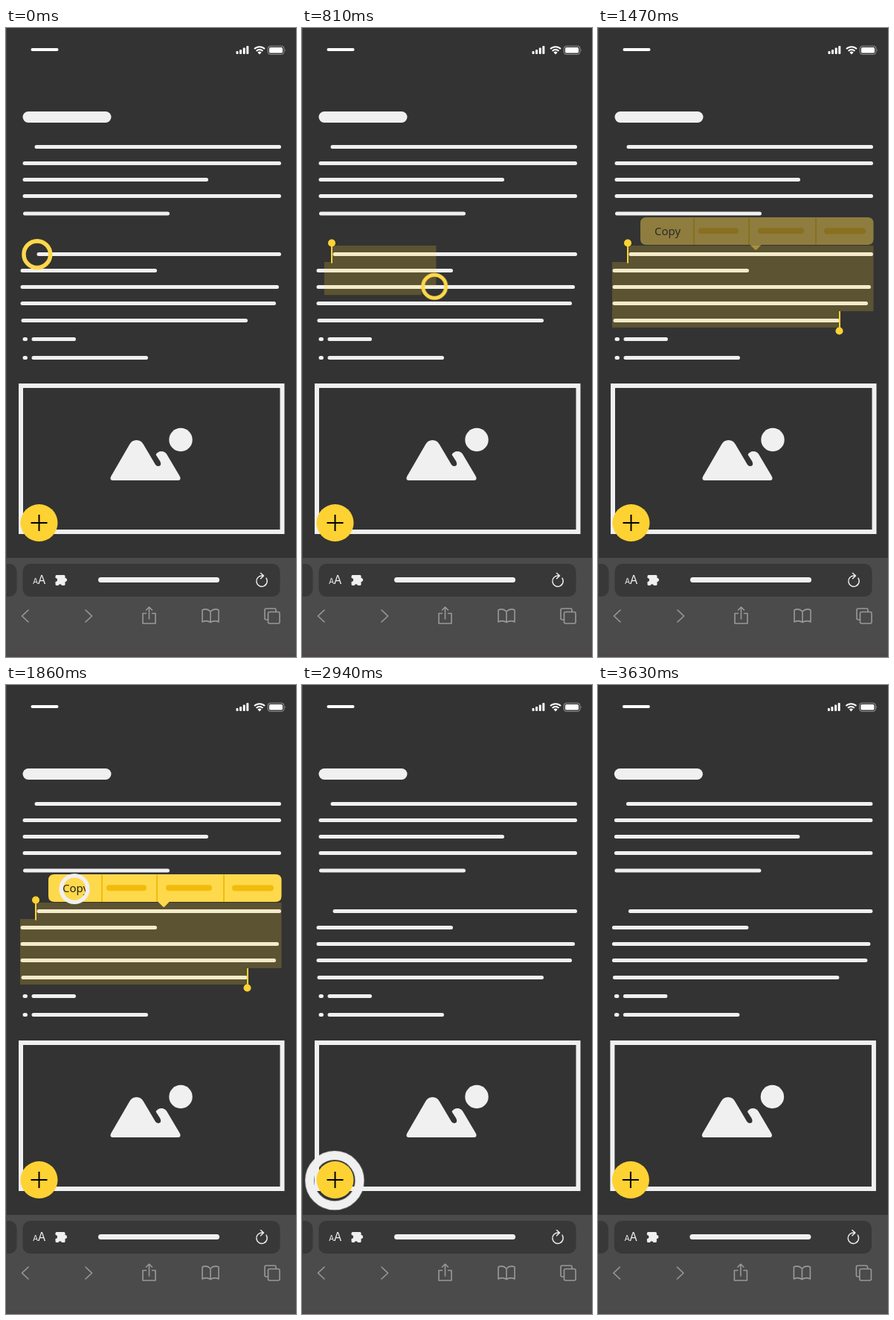
These frames come from a looping animation (390 by 844 pixels, 3840 ms). An HTML page without scripts:

```html
<!DOCTYPE html>
<html lang="en">
<head>
<meta charset="utf-8">
<title>Select and copy</title>
<style>
html, body { margin: 0; width: 100%; height: 100%; overflow: hidden; background: #333; }
svg { display: block; width: 390px; height: 844px; }
.screen, .edge, .ring, .cursor, .dot, .end, .selection, .menu { animation: 3840ms linear infinite; }
.line { fill: none; stroke: #f0f0f0; stroke-width: 5; stroke-linecap: round; }
.icon { fill: none; stroke: #999; stroke-width: 1.6; stroke-linecap: round; stroke-linejoin: round; }
.accent { fill: #ffd233; }
.ring { fill: none; stroke: #f0f0f0; r: 15.5px; stroke-width: 5px; }

.screen { animation-name: nudge; }
.edge { animation-name: edge; }
.drag { stroke: #ffd84a; animation-name: drag, lift; }
.tap { animation-name: tap, fade; }
.copy { animation-delay: -1980ms; }
.add { animation-delay: -990ms; }
.selection { fill: #ffd433; fill-opacity: .2; animation-name: select; }
.cursor { animation-name: cursor; }
.dot { animation-name: dot; }
.end { animation-name: end; }
.menu { animation-name: menu; }

@keyframes nudge {
  0%, 87.49% { transform: none; }
  87.5%, 100% { transform: translateX(-.6px); }
}
@keyframes edge {
  0%, 87.49% { opacity: 1; }
  87.5%, 100% { opacity: 0; }
}
/* press, follow the finger, release */
@keyframes drag {
  0% { r: 17.75px; stroke-width: 5.5px; translate: 0 0; animation-timing-function: cubic-bezier(.33, .4, .67, 1); }
  4.6875% { r: 32px; stroke-width: 12px; translate: 0 1px; animation-timing-function: ease-in-out; }
  14.0625% { r: 15.5px; stroke-width: 5px; translate: 0 0; animation-timing-function: ease-in-out; }
  28.125% { r: 15.5px; stroke-width: 5px; translate: 271px 85.5px; animation-timing-function: ease-out; }
  35.156%, 100% { r: 30px; stroke-width: 5px; translate: 271px 85.5px; }
}
@keyframes lift {
  0% { opacity: 1; }
  28.125% { opacity: 1; animation-timing-function: ease-in; }
  35.156%, 100% { opacity: 0; }
}
@keyframes tap {
  0% { r: 17.75px; stroke-width: 5.5px; translate: -1px 0; animation-timing-function: cubic-bezier(.33, .4, .67, 1); }
  4.6875% { r: 32px; stroke-width: 12px; translate: 0 1px; animation-timing-function: ease-in-out; }
  13.28125% { r: 15.5px; stroke-width: 5px; translate: 0 0; animation-timing-function: ease-out; }
  20.3125%, 100% { r: 30px; stroke-width: 5px; translate: 0 0; }
}
@keyframes fade {
  0% { opacity: 1; }
  13.28125% { opacity: 1; animation-timing-function: ease-in; }
  20.3125%, 100% { opacity: 0; }
}
@keyframes select {
  0% { d: path("M41 292H41V314H41V314H41V314H41Z"); }
  14.0625% { d: path("M41 292H41V314H41V314H41V314H41Z"); animation-timing-function: ease-in-out; }
  28.125% { d: path("M41 292H318V380H279V402H19V314H41Z"); animation-timing-function: ease-out; }
  35.156%, 68.74% { d: path("M41 292H370.500V380H326V402H19V314H41Z"); }
  68.75%, 100% { d: path("M41 292H41V314H41V314H41V314H41Z"); }
}
@keyframes cursor {
  0%, 7.8% { opacity: 0; }
  14.0625%, 68.74% { opacity: 1; }
  68.75%, 100% { opacity: 0; }
}
@keyframes dot {
  0%, 14.0625% { r: 0; }
  21%, 68.74% { r: 5px; }
  68.75%, 100% { r: 0; }
}
@keyframes end {
  0%, 28.125% { opacity: 0; }
  35.156%, 68.74% { opacity: 1; }
  68.75%, 100% { opacity: 0; }
}
@keyframes menu {
  0%, 35.156% { opacity: 0; }
  42.1875%, 62.49% { opacity: 1; }
  62.5%, 100% { opacity: 0; }
}
</style>
</head>
<body>
<svg viewBox="0 0 390 844">
  <rect width="390" height="844" fill="#333"/>
  <rect y="711" width="391" height="133" fill="#4b4b4b"/>
  <rect y="840" width="391" height="4" fill="#4d474a"/>

  <g class="screen">
    <!-- status bar -->
    <path class="line" style="stroke:#fff;stroke-width:4" d="M35.500 29H68.500"/>
    <g fill="#fff">
      <rect x="309.500" y="31" width="3" height="4" rx="1"/>
      <rect x="314" y="29" width="3" height="6" rx="1"/>
      <rect x="318.700" y="26.500" width="3" height="8.500" rx="1"/>
      <rect x="323.300" y="24" width="3" height="11" rx="1"/>
      <path d="M341 35.500l-2.600-2.700a3.800 3.800 0 0 1 5.200 0z"/>
      <rect x="354" y="26" width="18" height="7.500" rx="1.500"/>
      <path d="M375 28.200q1.500 1.500 0 3.400z" opacity=".5"/>
    </g>
    <path d="M334 28a10 10 0 0 1 14 0M336.600 30.900a6.300 6.300 0 0 1 8.800 0" fill="none" stroke="#fff" stroke-width="2"/>
    <rect x="352.300" y="24.300" width="21.500" height="11" rx="3" fill="none" stroke="#fff" stroke-opacity=".5"/>

    <!-- article -->
    <rect x="22.500" y="112" width="119" height="15" rx="7.500" fill="#f0f0f0"/>
    <path class="line" d="M41 159.500H367.500M25 181.500H367.500M25 203.500H269.500M25 225.500H367.500M25.500 249H217.500
      M44 303.500H367.500M22 325.500H200.500M22 347.500H364.500M22 369.500H360.500M23 392.500H322.500
      M25 417.500H26.500M37 417.500H91.500M25 442.500H26.500M37 442.500H188.500"/>
    <rect x="20" y="480" width="351.500" height="196" fill="none" stroke="#f0f0f0" stroke-width="6"/>
    <g fill="#f0f0f0">
      <circle cx="235" cy="552.500" r="15.700"/>
      <path d="M141 602L166 559Q169 553 175.500 553T185 559L201 586Q204 589.500 207.500 587Q209 584.500 207 581L201.500 572.500Q204 568 209 568Q214 568 216.500 572.500L234 602Q236 607 231 607H144Q139 607 141 602Z"/>
    </g>
    <circle class="accent" cx="44.500" cy="664" r="25"/>
    <path d="M33.500 664h22M44.500 653v22" stroke="#000" stroke-width="2"/>

    <!-- browser bar -->
    <rect x="-20" y="719" width="34.500" height="44" rx="10" fill="#383838"/>
    <rect x="22.500" y="719" width="346" height="44" rx="10" fill="#383838"/>
    <path class="line" style="stroke-width:7" d="M127.500 740.500H283.500"/>
    <g fill="#f0f0f0" font-family="Inter, sans-serif">
      <text x="36" y="746" font-size="10.500">A</text>
      <text x="42.800" y="746" font-size="15.500">A</text>
      <path d="M68 734h10q1.500 0 1.500 1.500v2.500a2.500 2.500 0 1 1 0 5v3.500q0 1.500-1.500 1.500h-3a2.300 2.300 0 0 0-4.500 0h-2.500q-1.500 0-1.500-1.500v-3.500a2.500 2.500 0 1 0 0-5v-2.500q0-1.500 1.500-1.500z"/>
    </g>
    <path class="icon" style="stroke:#f0f0f0;stroke-width:1.500" d="M350 738.200A7.200 7.200 0 1 1 344 735H346.500M342.500 731.500L346.500 735L342.500 738.800"/>
    <path class="icon" d="M30 781l-8.500 8l8.500 8M107 781l8.500 8l-8.500 8
      M188.500 785.500H184V799H201V785.500H196.500M192.500 793V777.500M188.500 781L192.500 777L196.500 781
      M275 783Q270 778 264 781V797Q270 794 275 797.500Q280 794 286 797V781Q280 778 275 783V797"/>
    <path class="icon" d="M352.500 794H350q-2 0-2-2V781q0-2 2-2H361q2 0 2 2V783.500"/>
    <rect class="icon" x="352.500" y="783.500" width="15.500" height="15.500" rx="2"/>

    <!-- selection -->
    <path class="selection" d="M41 292H41V314H41V314H41V314H41Z"/>
    <rect class="cursor accent" x="39" y="291" width="2" height="24.500"/>
    <circle class="dot accent" cx="40" cy="288.500"/>
    <g class="end accent">
      <rect x="324" y="380" width="2" height="24"/>
      <circle cx="324.500" cy="406.500" r="5"/>
    </g>

    <g class="menu">
      <path fill="#ffd94c" d="M65 254H362.500q8 0 8 8V283q0 8-8 8H219.500L213.500 297.300q-1.300 1.200-2.600 0L204.500 291H65q-8 0-8-8V262q0-8 8-8z"/>
      <path d="M129 254.500V291M203 254.500V291M293 254.500V291" stroke="#f2bc0a" stroke-width="2"/>
      <path d="M139 272.300H185M219 272.300H273M308 272.500H356" stroke="#f2bc0a" stroke-width="8" stroke-linecap="round"/>
      <text x="76" y="278" font-family="Noto Sans, sans-serif" font-size="15" fill="#222">Copy</text>
    </g>
  </g>
  <rect class="edge" width="1" height="844" fill="#4a4a4a"/>

  <circle class="ring drag" cx="41.800" cy="303.700"/>
  <circle class="ring tap copy" cx="93" cy="273.500"/>
  <g transform="translate(44.300 664) scale(1.24)">
    <circle class="ring tap add"/>
  </g>
</svg>
</body>
</html>
```
